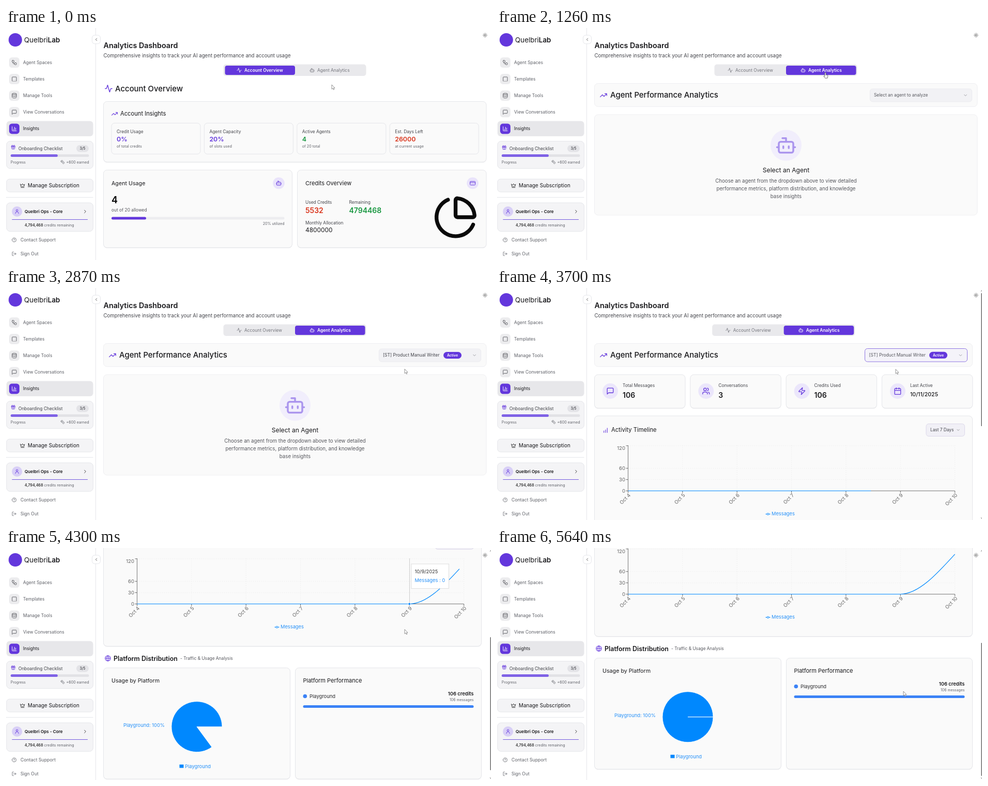
Write an HTML page that moves like this. It is 938x450 px and loops after 5710 ms.

```html
<!DOCTYPE html>
<html lang="en">
<head>
<meta charset="utf-8">
<title>Analytics Dashboard</title>
<style>
html, body { margin: 0; width: 100%; height: 100%; overflow: hidden; background: #fff; }
svg { display: block; width: 100%; height: 100%; font-family: Inter, "Open Sans", sans-serif; }
text { white-space: pre; }
</style>
</head>
<body>
<svg id="stage" viewBox="0 0 938 450"></svg>
<script>
const LOOP = 5710;
const PURPLE = '#6337dc', BLUE = '#0088fe', INK = '#18181b', GREY = '#5f6168';
const GREEN = '#16963f', RED = '#d9341b', EDGE = '#e5e6ea', PANEL = '#fafafa';

// Icon outlines on a 24 unit grid
const rr = (x, y, w, h, r) => `M${x + r} ${y}h${w - 2 * r}a${r} ${r} 0 0 1 ${r} ${r}v${h - 2 * r}a${r} ${r} 0 0 1 ${-r} ${r}h${2 * r - w}a${r} ${r} 0 0 1 ${-r} ${-r}v${2 * r - h}a${r} ${r} 0 0 1 ${r} ${-r}z`;
const ring = (x, y, r) => `M${x - r} ${y}a${r} ${r} 0 1 0 ${2 * r} 0a${r} ${r} 0 1 0 ${-2 * r} 0`;
const ICONS = {
  flow: rr(3, 3, 8, 8, 2) + 'M7 11v4a2 2 0 0 0 2 2h4' + rr(13, 13, 8, 8, 2),
  dashed: 'M5 21a2 2 0 0 1-2-2V5a2 2 0 0 1 2-2h14a2 2 0 0 1 2 2v14a2 2 0 0 1-2 2M9 21h1M14 21h1',
  data: 'M3 5a9 3 0 1 0 18 0a9 3 0 1 0-18 0V19A9 3 0 0 0 21 19V5M3 12A9 3 0 0 0 21 12',
  chat: 'M21 15a2 2 0 0 1-2 2H7l-4 4V5a2 2 0 0 1 2-2h14a2 2 0 0 1 2 2z',
  chart: 'M3 3v16a2 2 0 0 0 2 2h16M18 17V9M13 17V5M8 17v-3',
  bars: 'M18 20V4M12 20V10M6 20V14',
  gift: rr(3, 8, 18, 4, 1) + 'M12 8v13M19 12v7a2 2 0 0 1-2 2H7a2 2 0 0 1-2-2v-7M7.5 8a2.5 2.5 0 0 1 0-5A5 8 0 0 1 12 8a5 8 0 0 1 4.5-5a2.5 2.5 0 0 1 0 5',
  coins: ring(8, 8, 6) + 'M18 10.4A6 6 0 1 1 10.3 18M7 6h1v4M16.7 13.9l.7.7-2.8 2.8',
  crown: 'M3 6l4.5 5L12 4l4.5 7L21 6l-2.5 11h-13zM5 21h14',
  user: ring(12, 7, 4) + 'M5 21v-1a7 7 0 0 1 14 0v1',
  users: ring(9, 7, 4) + 'M2 21v-2a4 4 0 0 1 4-4h6a4 4 0 0 1 4 4v2M16 3.1a4 4 0 0 1 0 7.8M22 21v-2a4 4 0 0 0-3-3.9',
  right: 'M9 18l6-6-6-6', left: 'M15 18l-6-6 6-6', down: 'M6 9l6 6 6-6',
  help: ring(12, 12, 10) + 'M9 9a3 3 0 0 1 5.8 1c0 2-3 3-3 3M12 17v.1',
  exit: 'M9 21H5a2 2 0 0 1-2-2V5a2 2 0 0 1 2-2h4M16 17l5-5-5-5M21 12H9',
  sun: ring(12, 12, 4) + 'M12 2v2M12 20v2M5 5l1.4 1.4M17.7 17.7l1.4 1.4M2 12h2M20 12h2M6.3 17.7l-1.4 1.4M19 5l-1.4 1.4',
  pulse: 'M22 12h-2.5a2 2 0 0 0-1.9 1.5L15.2 21.8a.25.25 0 0 1-.5 0L9.2 2.2a.25.25 0 0 0-.5 0L6.4 10.5A2 2 0 0 1 4.5 12H2',
  trend: 'M16 7h6v6M22 7l-8.5 8.5-5-5L2 17',
  bot: 'M12 8V4H8' + rr(4, 8, 16, 12, 2) + 'M2 14h2M20 14h2M15 13v2M9 13v2',
  card: rr(2, 5, 20, 14, 2) + 'M2 10h20',
  pie: 'M21 12c.552 0 1.005-.449.95-.998a10 10 0 0 0-8.953-8.951c-.55-.055-.998.398-.998.95v8a1 1 0 0 0 1 1zM21.21 15.89A10 10 0 1 1 8 2.83',
  zap: 'M4 14a1 1 0 0 1-.8-1.6l9.9-10.2a.5.5 0 0 1 .9.5L12 8.7A1 1 0 0 0 13 10h7a1 1 0 0 1 .8 1.6l-9.9 10.2a.5.5 0 0 1-.9-.5l2-6A1 1 0 0 0 11 14z',
  date: 'M8 2v4M16 2v4' + rr(3, 4, 18, 18, 2) + 'M3 10h18',
  globe: ring(12, 12, 10) + 'M12 2a14.5 14.5 0 0 0 0 20a14.5 14.5 0 0 0 0-20M2 12h20'
};

const text = (x, y, s, size, fill = INK, weight = 400, anchor = 'start') =>
  `<text x="${x}" y="${y}" font-size="${size}" fill="${fill}" font-weight="${weight}" text-anchor="${anchor}">${s}</text>`;
const rect = (x, y, w, h, r, fill, stroke = 'none', extra = '') =>
  `<rect x="${x}" y="${y}" width="${w}" height="${h}" rx="${r}" fill="${fill}" stroke="${stroke}" ${extra}/>`;
const dot = (x, y, r, fill) => `<circle cx="${x}" cy="${y}" r="${r}" fill="${fill}"/>`;
const line = (d, stroke, w = 1, extra = '') => `<path d="${d}" fill="none" stroke="${stroke}" stroke-width="${w}" ${extra}/>`;
const icon = (name, x, y, size, color = PURPLE, w = 2) =>
  `<path d="${ICONS[name]}" transform="translate(${x - size / 2} ${y - size / 2}) scale(${size / 24})" fill="none" stroke="${color}" stroke-width="${w}" stroke-linecap="round" stroke-linejoin="round"/>`;
const panel = (x, y, w, h, shade = true) =>
  (shade ? rect(x, y + 1, w, h, 7, '#e9e9ec') : '') + rect(x, y, w, h, 7, PANEL, shade ? EDGE : '#efeff2');
const badge = (x, y) => rect(x, y - 6.5, 35, 13, 6.5, PURPLE) + text(x + 17.5, y + 2.6, 'Active', 6.9, '#fff', 600, 'middle');
const group = (id, body, extra = '') => `<g id="${id}" ${extra}>${body}</g>`;

function sidebar() {
  const items = [['flow', 'Agent Spaces'], ['dashed', 'Templates'], ['data', 'Manage Tools'], ['chat', 'View Conversations'], ['chart', 'Insights']];
  const nav = items.map(([name, label], i) => {
    const y = 67 + i * 32.1, on = i === 4;
    return (on ? rect(1, y - 15, 167.5, 29.5, 6, '#e7e7ea') : '') +
      rect(6, y - 10, 20, 20, 5.5, on ? PURPLE : '#ececee') +
      icon(name, 16, y, 11, on ? '#fff' : '#55565c') +
      text(33, y + 3, label, 8.5, on ? INK : GREY);
  }).join('');
  return rect(0, 0, 173.5, 450, 0, '#fff') + line('M173.5 0V450', EDGE) +
    dot(18, 23, 13, PURPLE) +
    `<text x="35" y="28" font-size="13.4" fill="${INK}">Quelbri<tspan font-weight="600">Lab</tspan></text>` +
    rect(166.5, 14, 16, 16.5, 5, '#fff', EDGE) + icon('left', 174.5, 22.3, 9, '#333') + nav +
    rect(1, 219.5, 167.5, 53, 7, '#f4f4f6', EDGE) + group('gift', icon('gift', 14, 231.5, 10)) +
    text(24, 236.5, 'Onboarding Checklist', 8.4, '#3f4046') +
    rect(136, 227, 24, 13.5, 6.7, '#e3e3e7') + text(148, 236.3, '3/5', 7, '#3f4046', 500, 'middle') +
    rect(9, 245, 151.5, 5, 2.5, '#e2e2e6') + rect(9, 245, 91, 5, 2.5, '#7f62e6') +
    text(9, 262.5, 'Progress', 6.9, GREY) + icon('coins', 109.5, 260, 8, GREY) +
    text(160.5, 262.5, '+600 earned', 7.15, GREY, 400, 'end') +
    rect(1, 293, 167.5, 25, 6, '#f4f4f6', EDGE) + icon('crown', 32, 305.5, 10.5, '#333') +
    text(42, 309, 'Manage Subscription', 9.95) + line('M0 328.5H168.5', EDGE) +
    rect(1, 339, 167.5, 55.5, 7, '#f4f4f6', EDGE) + dot(21.3, 356, 10, '#d8cff6') + icon('user', 21.3, 356, 10.5) +
    text(36, 359, 'Quelbri Ops - Core', 8.2, INK, 600) + icon('right', 153, 356, 11, '#333') +
    line('M11.5 371.5H158', '#7359de') +
    `<text x="36" y="384.5" font-size="7.1" fill="${GREY}"><tspan font-weight="600" fill="#333">4,794,468</tspan> credits remaining</text>` +
    icon('help', 15.7, 411, 9.5, GREY) + text(28, 413.8, 'Contact Support', 8.75, GREY) +
    icon('exit', 15.7, 438, 9.5, GREY) + text(28, 440.8, 'Sign Out', 8.6, GREY);
}

function tabs(active) {
  const ink = i => (i === active ? '#fff' : 'currentColor');
  return rect(420.5, 70.5, 276, 22.5, 5, '#e9e9ec') + rect(active ? 559 : 423.5, 73, 135.5, 18, 4, PURPLE) +
    icon('pulse', 451, 82, 10, ink(0)) + text(461, 85, 'Account Overview', 8.4, ink(0), active ? 400 : 600) +
    icon('bot', 592, 82, 10, ink(1)) + text(602, 85, 'Agent Analytics', 8.45, ink(1), active ? 600 : 400);
}

function overview() {
  const stats = [['Credit Usage', '0%', 'of total credits', PURPLE], ['Agent Capacity', '20%', 'of slots used', PURPLE],
    ['Active Agents', '4', 'of 20 total', GREEN], ['Est. Days Left', '26000', 'at current usage', RED]];
  return group('tabs', tabs(0)) + icon('pulse', 198.5, 117.5, 16) + text(211, 122.5, 'Account Overview', 14.9, INK, 500) +
    panel(188.5, 142.5, 740.5, 117.5) + icon('trend', 210, 166.5, 13) + text(221, 170, 'Account Insights', 11.2) +
    stats.map(([name, value, note, color], i) => {
      const x = 204 + i * 179.4;
      return rect(x, 184.5, 172, 60, 6, PANEL, EDGE) + text(x + 10, 204, name, 8.4, '#44454b') +
        text(x + 10, 220.2, value, 12.4, color, 600) + text(x + 10, 232, note, 7.2, GREY);
    }).join('') +
    panel(188.5, 275.5, 365, 150.5) + text(204, 305, 'Agent Usage', 10.7) +
    dot(527.5, 301, 11.3, '#e9e3fb') + icon('bot', 527.5, 301, 12) +
    text(204, 340, '4', 18, '#000', 600) + text(204, 356, 'out of 20 allowed', 8.4, '#55565c') +
    rect(204, 366.5, 334.5, 5, 2.5, '#ededf0') + rect(204, 366.5, 67, 5, 2.5, PURPLE) +
    text(538.5, 381.5, '20% utilized', 7.1, GREY, 400, 'end') +
    panel(563.5, 275.5, 365.5, 150.5) + text(579, 305, 'Credits Overview', 11) +
    dot(902.5, 301, 11.3, '#e9e3fb') + icon('card', 902.5, 301, 12) +
    text(579, 341, 'Used Credits', 8.4, '#44454b') + text(663.5, 341, 'Remaining', 8.4, '#44454b') +
    text(579, 359.2, '5532', 14, RED, 600) + text(663.5, 359.2, '4794468', 14, GREEN, 600) +
    text(579, 380.5, 'Monthly Allocation', 8.4, '#44454b') + text(579, 396.2, '4800000', 11.9) +
    icon('pie', 869.5, 367, 88.5, '#0a0a0a');
}

const AGENTS = [['[ST] Product Manual Writer', 846], ['[UZ] Customer Survey Planner', 853.5],
  ['[UZ] Prototype Reviewer', 830.5], ['[UZ] Weekly Task List', 820]];

const perfHead = w => panel(188.5, 107.5, w, 45, false) + icon('trend', 206, 130.5, 15) +
  text(219, 135.2, 'Agent Performance Analytics', 14.9, INK, 500);

function chooser() {
  const lines = ['Choose an agent from the dropdown above to view detailed', 'performance metrics, platform distribution, and knowledge', 'base insights'];
  return group('tabs2', tabs(1), 'color="#74757c"') + perfHead(740.5) +
    rect(721.5, 118, 197, 25, 5, '#f2f2f5', '#ebebef') +
    group('prompt', text(729, 133.3, 'Select an agent to analyze', 8.4, '#55565c')) +
    group('picked', text(729, 133.3, AGENTS[0][0], 8.5, '#44454b') + badge(846, 130.5)) +
    icon('down', 906, 130.5, 9.5, '#85868c') +
    panel(188.5, 168, 740.5, 195, false) + dot(559, 227.5, 30, '#f1eefc') + icon('bot', 559, 227.8, 42, '#ab95ee') +
    text(559, 280, 'Select an Agent', 12.1, INK, 400, 'middle') +
    lines.map((s, i) => text(559, 300 + i * 15, s, 9.7, '#55565c', 400, 'middle')).join('') +
    group('menu', rect(721, 147, 199, 89, 5, '#000', 'none', 'opacity=".07"') + rect(722, 145.5, 197, 87.5, 5, '#f9f9fa', EDGE) +
      rect(724.5, 148, 192.5, 20.5, 4, '#e9e9ec') +
      AGENTS.map(([s, x], i) => text(729, 161.3 + i * 20.7, s, 8.4, '#44454b') + badge(x, 158.3 + i * 20.7)).join(''));
}

function report() {
  const cards = [['chat', 'Total Messages', '106'], ['users', 'Conversations', '3'], ['zap', 'Credits Used', '106'], ['date', 'Last Active', '10/11/2025']];
  const tickX = i => 253.5 + i * 105.35, tickY = v => 393.5 - v * 0.73;
  let axes = '';
  for (let i = 0; i < 7; i++) {
    const x = tickX(i);
    axes += line(`M${x} 305V393`, '#ededed', 0.7, 'stroke-dasharray="2 2"') + line(`M${x} 393.5v4`, '#666') +
      `<g transform="translate(${x + 5.5} 402.5) rotate(-45)">${text(0, 0, 'Oct ' + (4 + i), 9.7, '#666', 400, 'end')}</g>`;
  }
  for (const v of [0, 30, 60, 120])
    axes += line(`M253.5 ${tickY(v)}H885.5`, '#ededed', 0.7, 'stroke-dasharray="2 2"') + line(`M249.5 ${tickY(v)}h4`, '#666') +
      text(248, (v === 120 ? 310 : tickY(v)) + 3.5, v, 9.6, '#666', 400, 'end');
  axes += line('M253.5 305V393.5H885.5', '#777');
  return `<g transform="translate(-4.3 0)" color="#74757c">${tabs(1)}</g>` + perfHead(731) +
    rect(711.5, 117.5, 198, 25.5, 5, '#f4f3f9', '#8f76e3') + text(719.5, 133.3, AGENTS[0][0], 8.5, '#55565c') +
    badge(836, 130.3) + icon('down', 896.5, 130.5, 9.5, '#85868c') +
    cards.map(([name, label, value], i) => {
      const x = 188.5 + i * 185.3;
      return panel(x, 168, 175.5, 65) + dot(x + 30.5, 200, 15, '#ebe6fb') + icon(name, x + 30.5, 200, 15.5) +
        text(x + 54.5, 192, label, 8.4, '#44454b') + text(x + 54.5, i === 3 ? 210.3 : 212.7, value, i === 3 ? 10.6 : 14, INK, i === 3 ? 500 : 600);
    }).join('') +
    panel(188.5, 248, 731, 227.5) + icon('bars', 210, 276, 13) + text(221, 279.3, 'Activity Timeline', 11.2) +
    rect(830, 263.5, 74.5, 24, 5, '#f1f0f6', '#dcd8ea') + text(838, 278.2, 'Last 7 Days', 8.3, '#44454b') + icon('down', 892, 275.5, 8.5, '#777') +
    axes + line('M780.5 305V393', '#ccc', 1, 'id="guide"') +
    line('M253.5 393.5H780.2C815.3 393.5 850.4 354.8 885.5 316.1', BLUE, 1.2, 'id="curve" pathLength="1"') +
    group('spot', dot(780.2, 393.5, 2.8, '#fff') + dot(780.2, 393.5, 2, BLUE)) +
    line('M519.5 438.5H528.5', BLUE, 1.2) + `<circle cx="524" cy="438.5" r="1.7" fill="#fff" stroke="${BLUE}"/>` +
    text(531, 441.3, 'Messages', 9.3, '#2590f8') +
    icon('globe', 197, 499, 12.5) + text(208, 503.5, 'Platform Distribution', 12.45, INK, 600) +
    text(337, 502, '- Traffic &amp; Usage Analysis', 8.3, '#55565c') +
    panel(188.5, 517.5, 361, 215.5) + text(204, 545.5, 'Usage by Platform', 10.7) +
    `<path id="wedge" fill="${BLUE}" stroke="#fff" stroke-width=".8"/>` +
    text(307, 631.8, 'Playground: 100%', 9.35, '#2590f8', 400, 'end') +
    rect(335.5, 705, 8, 6.5, 0, BLUE) + text(346, 711.5, 'Playground', 9.4, '#2590f8') +
    panel(559.5, 517.5, 360, 215.5) + text(574.5, 545.5, 'Platform Performance', 11) +
    dot(578.3, 572.5, 3.8, '#3b82f6') + text(587, 575.8, 'Playground', 9.4, '#27272a') +
    text(904.5, 571.2, '106 credits', 9.4, INK, 600, 'end') + text(904.5, 582.3, '106 messages', 6.9, GREY, 400, 'end') +
    rect(574.5, 590, 330, 5, 2.5, '#3b82f6') +
    group('tip', rect(0, 0, 72.5, 47.5, 0, '#fff', '#dedede') + text(6.5, 17.8, '10/9/2025', 9.3, '#333') +
      text(6.5, 35, 'Messages : 0', 9.3, '#2590f8'));
}

const stage = document.getElementById('stage');
stage.innerHTML = rect(0, 0, 938, 450, 0, '#fff') +
  group('page', text(188.5, 38.5, 'Analytics Dashboard', 14.3, INK, 600) +
    text(188.5, 57, 'Comprehensive insights to track your AI agent performance and account usage', 9.67, '#44454b') +
    group('overview', overview()) + group('chooser', chooser()) + group('report', report())) +
  icon('sun', 926.5, 14, 9.5, '#333') + sidebar() +
  group('bar', rect(934.5, 0, 3.5, 450, 0, '#fff') + rect(936.2, 10, 3, 258, 1, '#858585', 'none', 'id="thumb"') +
    line('M936 7l2-3M936 445l2 3', '#858585')) +
  group('glow', dot(0, 0, 7, '#f8e71c'), 'opacity=".7"') +
  group('arrow', '<path d="M0 0V8.6L2 6.8L3.4 9.8L4.8 9.2L3.5 6.3H6z" fill="#fff" stroke="#777" stroke-width=".8" stroke-linejoin="round"/>') +
  group('hand', '<path d="M-1 1a1 1 0 0 1 2 0V4.5L4 5.2Q5 5.5 4.8 7L4 11H-.5L-3.3 7.3Q-3 6-1 7.5z" fill="#fff" stroke="#555" stroke-width=".8" stroke-linejoin="round"/>');

const el = {};
stage.querySelectorAll('[id]').forEach(n => { el[n.id] = n; });
const set = (id, name, value) => el[id].setAttribute(name, value);
const show = (id, on) => set(id, 'display', on ? 'inline' : 'none');
const move = (id, x, y) => set(id, 'transform', `translate(${x} ${y})`);
const clamp = u => Math.max(0, Math.min(1, u));

// CSS "ease" curve
function ease(u) {
  u = clamp(u);
  let lo = 0, hi = 1;
  for (let i = 0; i < 22; i++) {
    const s = (lo + hi) / 2, q = 1 - s;
    if (0.75 * q * q * s + 0.75 * q * s * s + s * s * s < u) lo = s; else hi = s;
  }
  const q = 1 - lo;
  return 0.3 * q * q * lo + 3 * q * lo * lo + lo * lo * lo;
}

// Pointer stops: time, x, y
const POINTER = [[0, 630, 110], [40, 630, 110], [340, 627, 85], [1230, 627, 85], [1520, 880, 124], [1800, 765, 134], [1920, 765, 134],
  [2350, 771, 157], [4870, 771, 158], [4950, 772, 170], [5270, 780, 364], [5570, 782, 268], [5640, 786, 278], [LOOP, 786, 278]];
function pointer(t) {
  const i = Math.max(1, POINTER.findIndex(p => p[0] > t));
  const [t0, x0, y0] = POINTER[i - 1], [t1, x1, y1] = POINTER[i];
  const u = clamp((t - t0) / (t1 - t0)), k = u * u * (3 - 2 * u);
  return [x0 + (x1 - x0) * k, y0 + (y1 - y0) * k];
}

function wedge(part) {
  const cx = 369, cy = 631.7, r = 49, a = Math.min(part, 0.9999) * 2 * Math.PI;
  return `M${cx} ${cy}L${cx + r} ${cy}A${r} ${r} 0 ${a > Math.PI ? 1 : 0} 0 ${cx + r * Math.cos(a)} ${cy - r * Math.sin(a)}Z`;
}

function draw(t) {
  const SWITCH = 850, OPEN = 1880, PICK = 2570, MOUNT = 3030;
  const ready = t >= MOUNT, picked = t >= PICK;
  show('overview', t < SWITCH);
  show('chooser', t >= SWITCH && !ready);
  show('report', ready);
  show('bar', ready);
  show('menu', t >= OPEN && !picked);
  show('prompt', !picked);
  show('picked', picked);
  set('tabs', 'color', t > 230 ? '#44454b' : '#74757c');

  const scroll = Math.round(304 * (1 - Math.pow(1 - clamp((t - 3720) / 1038), 3.4)));
  move('page', 0, -scroll);
  move('thumb', 0, scroll * 0.572);

  set('curve', 'stroke-dasharray', `${ease((t - 3070) / 1500)} 2`);
  set('wedge', 'd', wedge(ease((t - 3470) / 1500)));
  const hover = t >= 3938 && t < 4900, slide = ease((t - 3938) / 400);
  for (const id of ['tip', 'guide', 'spot']) show(id, hover);
  move('tip', 253 + 533.5 * slide, 308.5 + 7.5 * slide);

  move('gift', 0, -0.5 * Math.cos(t / LOOP * 12 * Math.PI));

  const [x, y] = pointer(t), onTab = t > 230 && t < 1290;
  show('hand', onTab);
  show('arrow', !onTab);
  show('glow', t >= 630 && t < 900);
  move('hand', x, y);
  move('arrow', x, y);
  move('glow', x, y + 2);
}

const start = performance.now();
function tick() {
  draw((performance.now() - start) % LOOP);
  requestAnimationFrame(tick);
}
draw(0);
requestAnimationFrame(tick);
</script>
</body>
</html>
```
